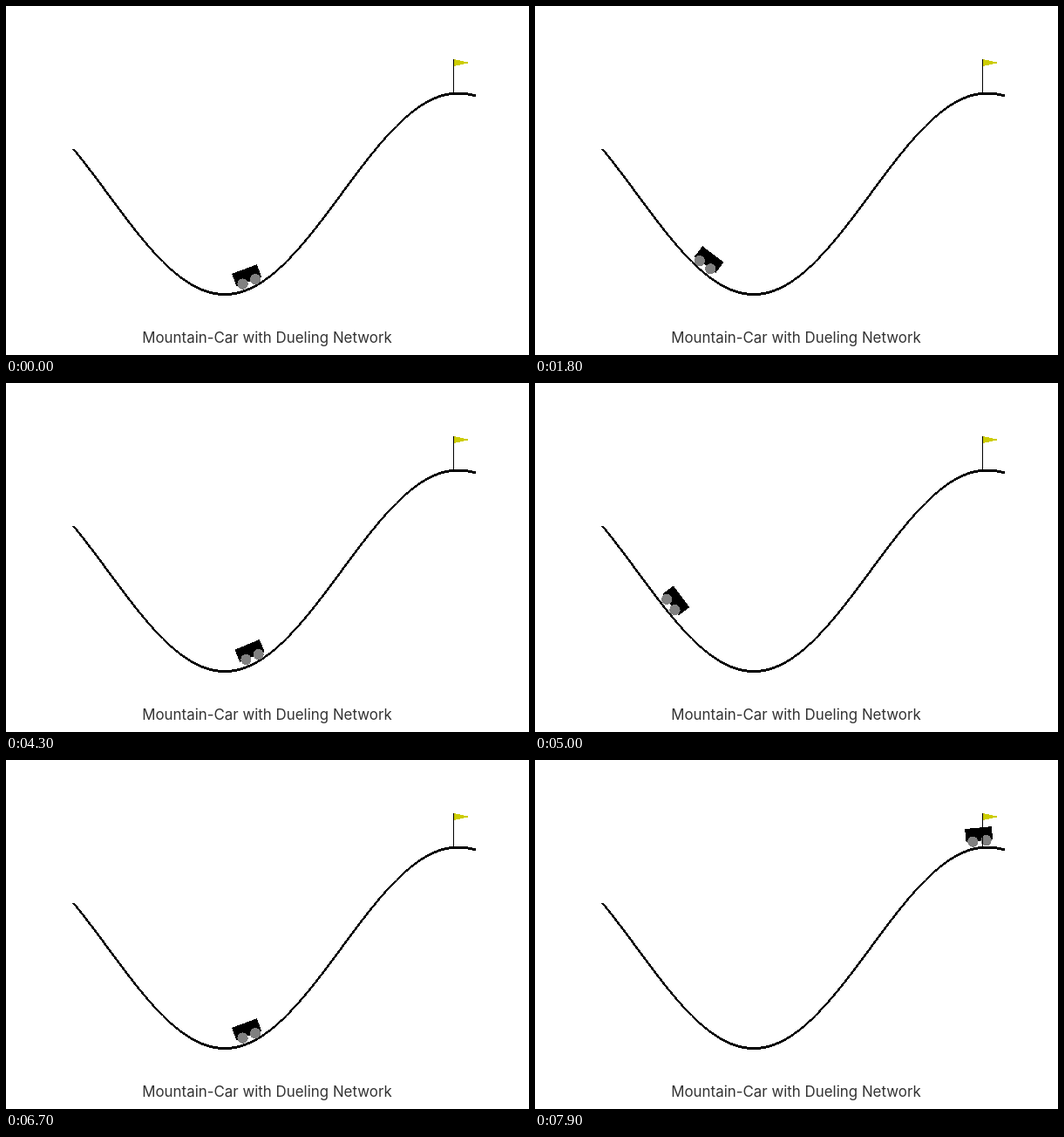
Animation of 600 by 400 pixels, one loop 8 s. Source, as an HTML page with a canvas:

```html
<!DOCTYPE html>
<html lang="en">
<head>
<meta charset="utf-8">
<title>Mountain-Car with Dueling Network</title>
<style>
  html, body { margin: 0; width: 100%; height: 100%; overflow: hidden; background: #fff; }
  canvas, svg { position: absolute; left: 0; top: 0; }
  p {
    position: absolute; left: 0; top: 370px; width: 599px; margin: 0;
    text-align: center; font: 16.9px/20px Inter, Roboto, sans-serif; color: #333;
  }
</style>
</head>
<body>
<canvas id="track" width="600" height="400"></canvas>
<svg width="600" height="400" shape-rendering="crispEdges">
  <g id="car">
    <rect x="-20" y="-30" width="40" height="20"/>
    <circle cx="10" cy="-10" r="8" fill="#808080"/>
    <circle cx="-10" cy="-10" r="8" fill="#808080"/>
  </g>
  <rect x="513" y="61" width="1" height="39"/>
  <path d="M514 61V69L532 65Z" fill="#cccc00"/>
</svg>
<p>Mountain-Car with Dueling Network</p>
<script>
const LOOP = 8000, STEP = 100;
const MIN_X = -1.2, MAX_X = 0.6;
const LEFT = 77.6, BASE = 356.1, SCALE = 256.1;
const CAR_SCALE = 0.768;

// Turning points of the car; skew below 1 makes the swing leave earlier
const turns = [
  { at: 0, x: -0.404 },
  { at: 21, x: -0.777, skew: 0.97 },
  { at: 36.7, x: -0.155, skew: 0.88 },
  { at: 56.3, x: -1.152, skew: 1 },
  { at: 79, x: 0.491, skew: 1 }
];

const toX = x => LEFT + (x - MIN_X) * SCALE;
const toY = x => BASE - (Math.sin(3 * x) * 0.45 + 0.55) * SCALE;
const toHill = px => MIN_X + (px - LEFT) / SCALE;
const swing = s => (1 - Math.cos(Math.PI * s)) / 2;

function positionAt(step) {
  const next = turns.findIndex((turn, i) => i > 0 && step <= turn.at);
  const from = turns[next - 1], to = turns[next];
  const s = (step - from.at) / (to.at - from.at);
  return from.x + (to.x - from.x) * swing(s ** to.skew);
}

// A hard-edged line, three pixels thick along its minor axis
function drawTrack() {
  const ctx = document.getElementById('track').getContext('2d');
  let lastRow = null;
  for (let px = LEFT; px < toX(MAX_X); px += 0.5) {
    const x = toHill(px), row = Math.floor(toY(x));
    if (Math.abs(1.35 * Math.cos(3 * x)) < 1) {
      const col = Math.floor(px);
      ctx.fillRect(col, Math.round(toY(toHill(col + 0.5)) - 1.5), 1, 3);
    } else if (row !== lastRow) {
      ctx.fillRect(Math.round(px - 1.5), row, 3, 1);
    }
    lastRow = row;
  }
}

const car = document.getElementById('car');
const start = performance.now();

function draw() {
  const time = (performance.now() - start) % LOOP;
  const x = positionAt(Math.floor(time / STEP));
  const angle = -Math.cos(3 * x) * 180 / Math.PI;
  car.setAttribute('transform',
    `translate(${toX(x)} ${toY(x)}) rotate(${angle}) scale(${CAR_SCALE})`);
  requestAnimationFrame(draw);
}

drawTrack();
draw();
</script>
</body>
</html>
```
